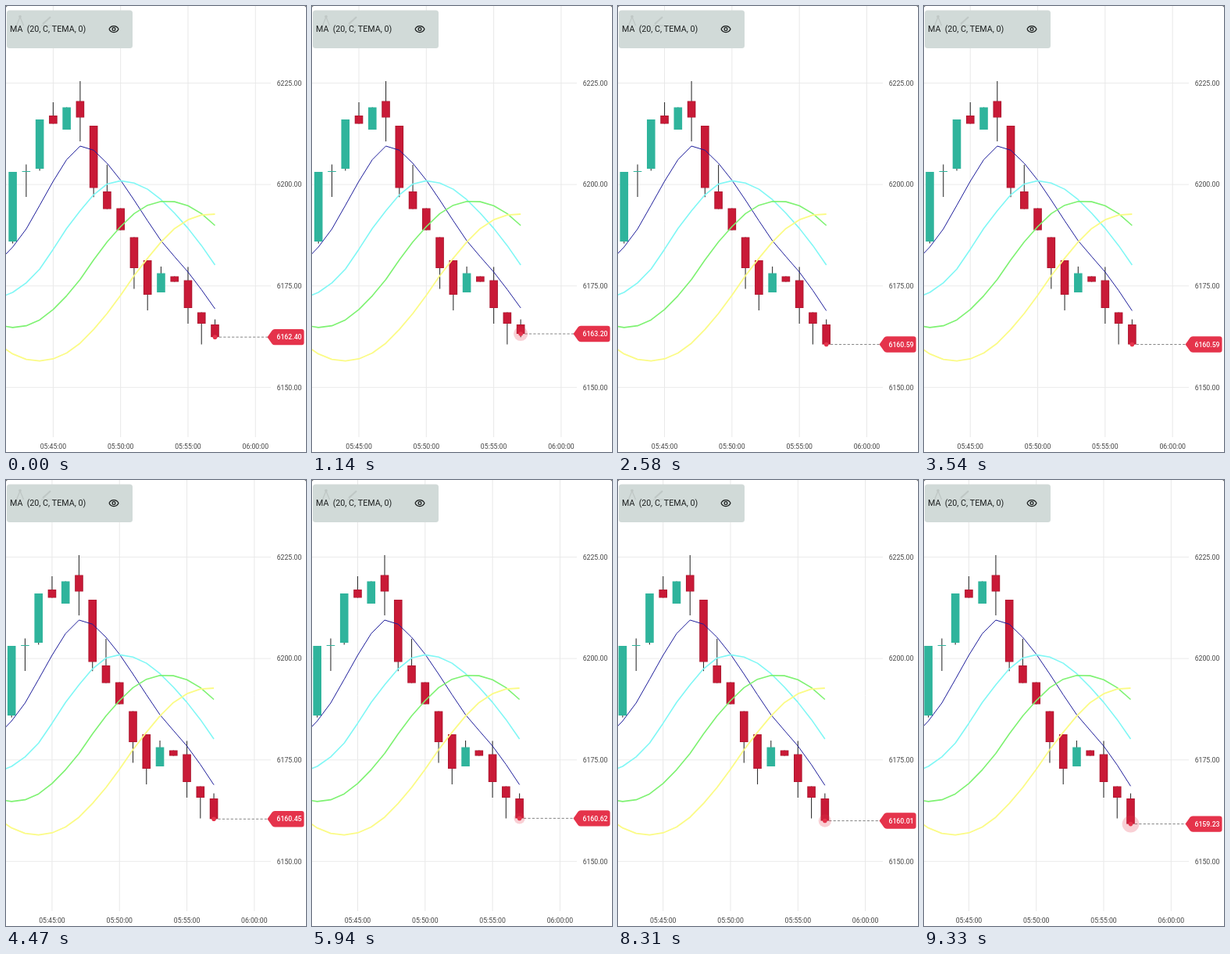
Recreate the animation shown at these times as an HTML page with a canvas. Size 384 by 570 pixels, loop 9360 ms.

```html
<!DOCTYPE html>
<html lang="en">
<head>
<meta charset="utf-8">
<title>Candle chart</title>
<style>
html, body { margin: 0; width: 100%; height: 100%; overflow: hidden; background: #fff; }
canvas { display: block; width: 384px; height: 570px; }
</style>
</head>
<body>
<canvas id="chart"></canvas>
<script>
const W = 384, H = 570, LOOP = 9360;
const STEP = 17.26, SCROLL = 0.00032, UNIT = 5.185;
const RED = '#e5334b', FONT = 'Roboto, "Open Sans", sans-serif';

const canvas = document.getElementById('chart');
const ctx = canvas.getContext('2d');
const dpr = window.devicePixelRatio || 1;
canvas.width = W * dpr;
canvas.height = H * dpr;
ctx.scale(dpr, dpr);

// Heights of open and close
const bodies = [
  [301, 212], [212, 211], [208, 145], [140, 150.5], [158, 129.5],
  [121.5, 142.5], [153, 232.5], [237, 259.5], [258.5, 286.5], [295.5, 335],
  [325, 369], [366, 341.5], [345.5, 352.5], [350.5, 386], [391.5, 406]
];

// Wick lengths above and below the body
const wickUp = i => i % 2 ? 8.5 * ((i + 1) / 2 % 5) : 0;
const wickDown = i => 32 * Math.max(0, Math.cos(2 * Math.PI * (i - 1) / 4.2));

// Evenly spaced key heights; the first line follows the price
const averages = [
  { color: '#1c1c9a', width: 1, keys: [326, 285, 224, 179, 201, 248, 300, 340, 387], live: true },
  { color: '#80f7f5', width: 1.6, keys: [373, 343, 276.5, 227.5, 231, 271, 331] },
  { color: '#7ef272', width: 1.6, keys: [408, 404.3, 364, 301.5, 257.5, 251.3, 280.5] },
  { color: '#fbfb86', width: 1.8, keys: [433, 453.5, 440, 393, 329.5, 280, 266] }
];

// time, price
const ticks = [
  [0, 6162.40], [570, 6163.20], [2250, 6160.59], [4050, 6160.45],
  [5550, 6160.62], [7020, 6160.01], [8820, 6159.23]
];

const priceY = p => 228.2 - (p - 6200) * UNIT;
const ease = k => k * k * (3 - 2 * k);

function priceAt(t) {
  let p = ticks[0][1];
  for (const [start, value] of ticks) {
    if (t >= start) p += (value - p) * ease(Math.min(1, (t - start) / 270));
  }
  return p;
}

// Smooth curve through evenly spaced keys, u from 0 to 1
function spline(keys, u) {
  const last = keys.length - 1;
  const i = Math.min(last - 1, Math.floor(u * last));
  const k = u * last - i;
  const slope = j => {
    if (j === 0) return (4 * keys[1] - 3 * keys[0] - keys[2]) / 2;
    if (j === last) return (3 * keys[last] - 4 * keys[last - 1] + keys[last - 2]) / 2;
    return (keys[j + 1] - keys[j - 1]) / 2;
  };
  return keys[i] + (keys[i + 1] - keys[i]) * ease(k)
    + slope(i) * k * (1 - k) ** 2 - slope(i + 1) * k * k * (1 - k);
}

function line(x1, y1, x2, y2, color, width = 1) {
  ctx.strokeStyle = color;
  ctx.lineWidth = width;
  ctx.beginPath();
  ctx.moveTo(x1, y1);
  ctx.lineTo(x2, y2);
  ctx.stroke();
}

function disc(x, y, r, color) {
  ctx.fillStyle = color;
  ctx.beginPath();
  ctx.arc(x, y, r, 0, Math.PI * 2);
  ctx.fill();
}

function label(text, x, y, color, size = 8.7, align = 'center', weight = 400) {
  ctx.font = `${weight} ${size}px ${FONT}`;
  ctx.textAlign = align;
  ctx.fillStyle = color;
  ctx.fillText(text, x, y);
}

function drawGrid(left) {
  for (let i = 0; i < 4; i++) {
    const y = 98.5 + i * 25 * UNIT;
    line(0, y, 339, y, '#ebebeb');
    label((6225 - i * 25).toFixed(2), 362.5, y + 3.2, '#444');

    const x = left + STEP * (3 + i * 5);
    const minutes = 345 + i * 5;
    const time = [Math.floor(minutes / 60), minutes % 60, 0];
    line(x, 0, x, 551, '#e8e8e8');
    label(time.map(n => String(n).padStart(2, '0')).join(':'), x, 565.5, '#444');
  }
}

function drawCandle(x, open, close, up, down) {
  const top = Math.min(open, close), height = Math.abs(open - close);
  const rising = close < open;
  line(x, top - up, x, top + height + down, '#333', 1.1);
  ctx.fillStyle = rising ? '#2fb49c' : '#a9152d';
  ctx.fillRect(x - 5.3, top, 10.6, height);
  if (!rising) {
    ctx.fillStyle = '#c91a37';
    ctx.fillRect(x - 4.4, top + 0.6, 8.8, Math.max(0, height - 1.2));
  }
}

function drawAverage(left, { color, width, keys, live }, tip) {
  const points = live ? [...keys.slice(0, -1), tip] : keys;
  ctx.strokeStyle = color;
  ctx.lineWidth = width;
  ctx.lineJoin = 'round';
  ctx.beginPath();
  for (let i = 0; i <= 16; i++) {
    ctx.lineTo(left + (i - 1) * STEP, spline(points, i / 16));
  }
  ctx.stroke();
}

function drawPrice(x, price, t) {
  const y = priceY(price);
  ctx.setLineDash([3.2, 2.2]);
  line(x, y, 336, y, '#858585');
  ctx.setLineDash([]);

  const phase = (t / 900 + 0.1) % 1;
  const halo = 11 * ease(1 - Math.abs(2 * phase - 1));
  disc(x, y, halo, 'rgba(229, 51, 75, 0.23)');
  disc(x, y, 2.8, RED);

  ctx.fillStyle = RED;
  ctx.beginPath();
  ctx.moveTo(334.5, y);
  ctx.lineTo(340.5, y - 8.5);
  ctx.quadraticCurveTo(341.8, y - 10.2, 344, y - 10.2);
  ctx.arcTo(381.5, y - 10.2, 381.5, y, 3);
  ctx.arcTo(381.5, y + 10.2, 344, y + 10.2, 3);
  ctx.lineTo(344, y + 10.2);
  ctx.quadraticCurveTo(341.8, y + 10.2, 340.5, y + 8.5);
  ctx.fill();
  label(price.toFixed(2), 362.5, y + 3.2, '#fff', 8.7, 'center', 500);
}

function drawPanel() {
  ctx.fillStyle = '#d1dad8';
  ctx.beginPath();
  ctx.roundRect(1, 5.5, 161, 48.5, 3.5);
  ctx.fill();

  // Faint tools: compass and pencil
  const faint = '#bfc7c5';
  line(18, 14, 13.5, 25, faint, 1.3);
  line(18, 14, 22.5, 25, faint, 1.3);
  disc(18, 13.5, 1.8, faint);
  line(47, 23, 57, 14, faint, 2.2);
  line(45, 25, 61, 25, faint, 1);

  label('MA  (20, C, TEMA, 0)', 5, 33.3, '#1c1f1f', 10.7, 'left');

  ctx.strokeStyle = '#171a1a';
  ctx.lineWidth = 1.2;
  ctx.beginPath();
  ctx.moveTo(132, 29.6);
  ctx.bezierCurveTo(134.3, 24.3, 141.7, 24.3, 144, 29.6);
  ctx.bezierCurveTo(141.7, 34.9, 134.3, 34.9, 132, 29.6);
  ctx.stroke();
  ctx.beginPath();
  ctx.arc(138, 29.6, 1.9, 0, Math.PI * 2);
  ctx.stroke();
}

function drawCorners() {
  ctx.fillStyle = '#555';
  for (const [x, side] of [[0, 1], [W, -1]]) {
    ctx.beginPath();
    ctx.moveTo(x, 0);
    ctx.lineTo(x + side * 2.5, 0);
    ctx.quadraticCurveTo(x, 0, x, 2.5);
    ctx.fill();
  }
}

function draw(t) {
  const left = 8.6 - t * SCROLL;
  const lastX = left + STEP * bodies.length;
  const price = priceAt(t);
  const y = priceY(price), startY = priceY(ticks[0][1]);

  ctx.fillStyle = '#fff';
  ctx.fillRect(0, 0, W, H);
  drawGrid(left);
  bodies.forEach(([open, close], i) => {
    drawCandle(left + i * STEP, open, close, wickUp(i), wickDown(i));
  });
  drawCandle(lastX, 407, y, 6.5, Math.max(0, startY - y));

  const tip = 387 + (y - startY) * 0.26;
  for (const average of averages) drawAverage(left, average, tip);
  drawPrice(lastX, price, t);
  drawPanel();
  drawCorners();
}

const begin = performance.now();
function frame() {
  draw((performance.now() - begin) % LOOP);
  requestAnimationFrame(frame);
}
frame();
</script>
</body>
</html>
```
